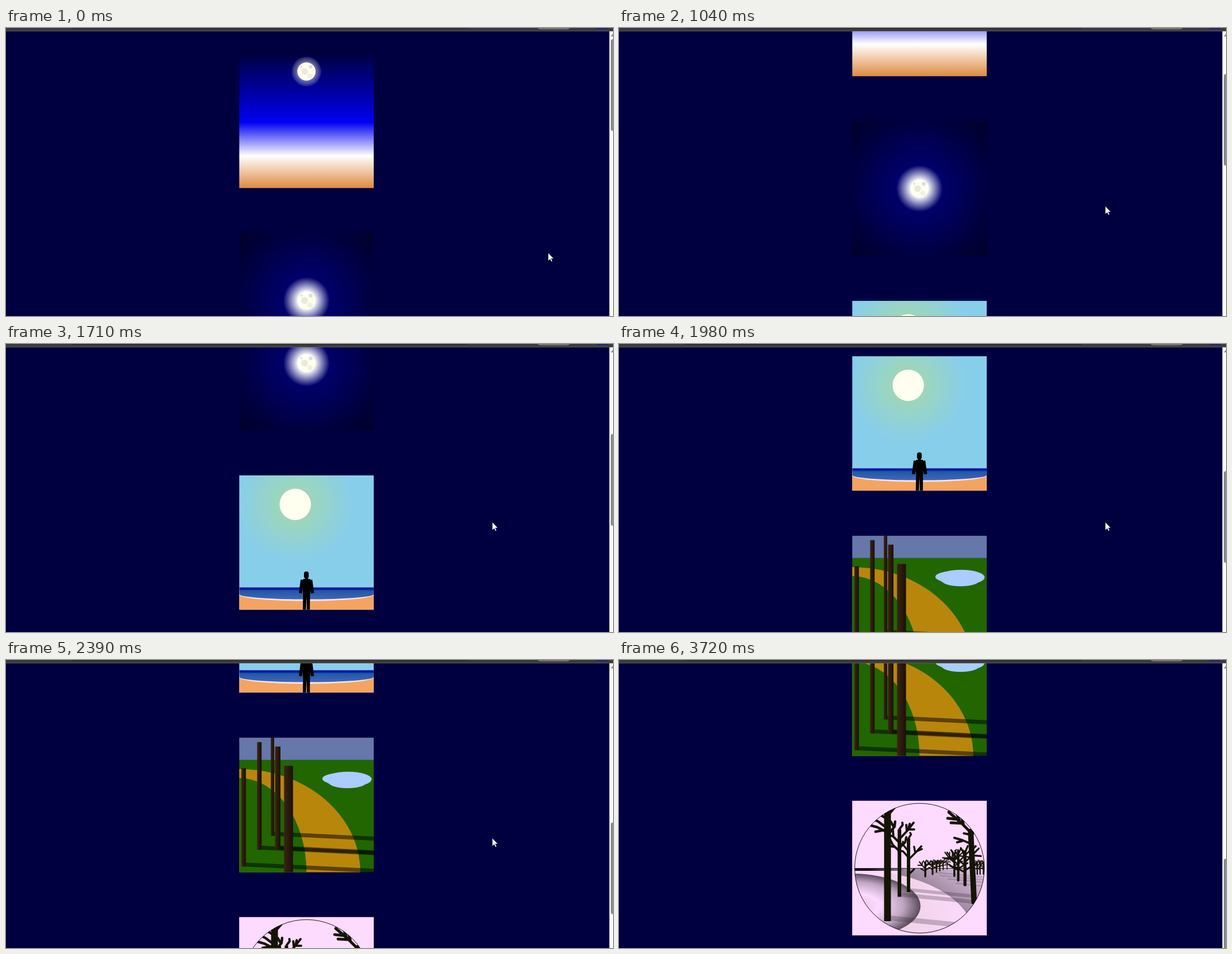
Recreate the animation shown at these times as an HTML page. Size 1086 px wide and 515 px high, loop 4650 ms.

```html
<!DOCTYPE html>
<html lang="en">
<head>
<meta charset="utf-8">
<title>Scrolling scenes</title>
<style>
  html, body { margin: 0; width: 100%; height: 100%; overflow: hidden; background: #000040; }
  svg { display: block; width: 1086px; height: 515px; }
</style>
</head>
<body>
<svg viewBox="0 0 1086 515">
  <defs>
    <linearGradient id="dusk" x2="0" y2="1">
      <stop stop-color="#000040"/><stop offset=".51" stop-color="#0000f2"/>
      <stop offset=".76" stop-color="#fff"/><stop offset="1" stop-color="#dd8a40"/>
    </linearGradient>
    <radialGradient id="night" r=".707">
      <stop stop-color="#000080"/><stop offset="1" stop-color="#000026"/>
    </radialGradient>
    <radialGradient id="halo">
      <stop offset=".38" stop-color="#fff" stop-opacity=".95"/><stop offset="1" stop-color="#fff" stop-opacity="0"/>
    </radialGradient>
    <radialGradient id="dimHalo">
      <stop offset=".5" stop-color="#fff" stop-opacity=".5"/><stop offset=".9" stop-color="#fff" stop-opacity=".12"/>
      <stop offset=".9" stop-color="#fff" stop-opacity=".03"/><stop offset="1" stop-color="#fff" stop-opacity="0"/>
    </radialGradient>
    <radialGradient id="day" gradientUnits="userSpaceOnUse" cx="125" cy="65" r="130">
      <stop offset=".25" stop-color="#9ed6b9"/><stop offset="1" stop-color="#87ceeb"/>
    </radialGradient>
    <linearGradient id="sea" gradientUnits="userSpaceOnUse" x1="0" y1="250" x2="0" y2="279">
      <stop stop-color="#0010a0"/><stop offset=".14" stop-color="#0019a4"/>
      <stop offset=".25" stop-color="#2059a3"/><stop offset="1" stop-color="#4866be"/>
    </linearGradient>
    <linearGradient id="bark">
      <stop stop-color="#3a2512"/><stop offset="1" stop-color="#1a1005"/>
    </linearGradient>
    <linearGradient id="strip">
      <stop offset=".3" stop-color="#141214"/><stop offset="1" stop-color="#8a778c"/>
    </linearGradient>
    <linearGradient id="field" x1="0" y1="1" x2=".9" y2="0">
      <stop offset=".2" stop-color="#4c404e"/><stop offset=".55" stop-color="#9a859c"/><stop offset="1" stop-color="#e3c4e5"/>
    </linearGradient>
    <linearGradient id="road">
      <stop offset=".3" stop-color="#fddaff"/><stop offset=".7" stop-color="#efd2e6"/><stop offset="1" stop-color="#fddaff"/>
    </linearGradient>
    <radialGradient id="hill">
      <stop stop-color="#e0c0e2"/><stop offset=".4" stop-color="#fddaff"/>
      <stop offset=".75" stop-color="#c0a5c2"/><stop offset="1" stop-color="#5a4d5c"/>
    </radialGradient>
    <clipPath id="square"><rect width="300" height="300"/></clipPath>
    <clipPath id="disc"><circle cx="537.7" cy="372.3" r="116"/></clipPath>
    <clipPath id="view"><rect y="6" width="1080" height="509"/></clipPath>
  </defs>
  <rect width="1086" height="515" fill="#000040"/>
  <g clip-path="url(#view)"><g id="page"></g></g>
  <rect width="1086" height="5" fill="#3b3b3b"/>
  <rect x="118" width="710" height="1" fill="#222"/>
  <rect y="5" width="1086" height="1" fill="#5a5a50"/>
  <path d="M952 0q2 1.5 6 1.5h44q4 0 6-1.5" fill="none" stroke="#c8b8a0"/>
  <rect x="1057" width="19" height="1.5" fill="#1818a0"/>
  <rect x="1079.5" y="6" width="6.5" height="509" fill="#fcfcfc"/>
  <path d="M1082 15l4-5v5z" fill="#888"/>
  <rect id="thumb" x="1082" y="20" width="10" height="164" rx="4" fill="#8a8a8a"/>
  <path id="cursor" d="M0 0V14.5L3.4 11.4L5.6 16L7.7 15L5.6 10.4H10Z" fill="#fff" stroke="#000" stroke-width=".6"/>
</svg>
<script>
const byId = id => document.getElementById(id);
const rect = (x, y, w, h, fill, more = '') =>
  `<rect x="${x}" y="${y}" width="${w}" height="${h}" fill="${fill}" ${more}/>`;
const oval = (x, y, rx, ry, fill) =>
  `<ellipse cx="${x}" cy="${y}" rx="${rx}" ry="${ry}" fill="${fill}"/>`;
const shape = (d, fill) => `<path d="${d}" fill="${fill}"/>`;
const panel = (index, content) =>
  `<g transform="translate(417.2 ${45.7 + 321 * index}) scale(.8025)"><g clip-path="url(#square)">${content}</g></g>`;

function moon(y, haloRadius, halo) {
  return oval(150, y, haloRadius, haloRadius, `url(#${halo})`) +
    oval(150, y, 20.3, 20.3, '#fffff0') +
    oval(146, y, 7.6, 7.6, '#ebe9da') + oval(159.5, y - 10.5, 4.3, 4.3, '#dedee0') +
    oval(138.5, y - 11, 2.5, 2.5, '#dedee0') + oval(158, y + 10.5, 6, 6, '#f2f0df');
}

function beach() {
  const limb = (x1, x2) =>
    `<path d="M${x1} 233L${x2} 263" stroke="#000" stroke-width="7"/>`;
  return rect(0, 0, 300, 300, 'url(#day)') + oval(125, 65, 35, 35, '#fffff0') +
    rect(0, 250, 300, 50, '#f4a460') +
    shape('M0 250H300V266A150 14.5 0 0 1 0 266Z', '#f6d9c4') +
    shape('M0 250H300V265.5A150 13.5 0 0 1 0 265.5Z', '#e8ecfa') +
    shape('M0 250H300V265A150 11.5 0 0 1 0 265Z', 'url(#sea)') +
    rect(144.5, 214.5, 10.5, 15.5, '#000', 'rx="4.5"') + rect(147, 226, 6, 8, '#000') +
    rect(142, 231, 16.5, 30, '#000', 'rx="2"') +
    limb(140.5, 136.5) + limb(159.5, 163.5) +
    shape('M142.5 258H158L157.5 300H150.8L150 268L148.8 300H141.8Z', '#000');
}

function forest() {
  // x, top, width, bottom
  const trunks = [[5, 68, 10, 287.5], [40, 10, 10, 250], [70.5, 0, 7.5, 219], [80, 20, 12, 250], [100, 63, 20, 320]];
  const shadow = ([x, , w, bottom]) =>
    shape(`M${x + w} ${bottom - 9}l300 14.5v9l-300 -14.5z`, 'rgba(0,0,0,.5)');
  return rect(0, 0, 300, 50, '#6677aa') + rect(0, 50, 300, 250, '#216600') +
    oval(0, 300, 270, 230, '#b8860b') + oval(0, 300, 150, 210, '#216600') +
    oval(242.8, 92.9, 52.4, 16.8, '#aaccff') + oval(220.5, 91.6, 35, 12, '#aaccff') +
    oval(241.5, 100.4, 41.5, 12.3, '#aaccff') +
    trunks.map(shadow).join('') +
    trunks.map(([x, y, w, bottom]) => rect(x, y, w, bottom - y, 'url(#bark)')).join('');
}

const bark = '#141405';
const strokes = (d, width) =>
  `<path d="${d}" fill="none" stroke="${bark}" stroke-width="${width}" stroke-linecap="round" stroke-linejoin="round"/>`;

function smallTree(x, base, height, width) {
  const place = `translate(${x} ${base}) scale(${height})`;
  return `<g transform="${place}">` + strokes('M0 0V-.95', width / height) +
    strokes('M0 -.65L.2 -.85L.4 -1.05M.2 -.85L.46 -.83M.2 -.85L.17 -1.08M0 -.55L-.22 -.76L-.4 -1M-.22 -.76L-.5 -.77' +
      'M-.22 -.76L-.2 -1M0 -.92L.08 -1.12M0 -.85L-.12 -1.06M0 -.42L.34 -.62M0 -.36L-.3 -.52', width * .6 / height) + '</g>';
}

function winter() {
  const shadow = (x, y, length, thick, alpha = .25) =>
    shape(`M${x} ${y}l${length} ${length * .1}v${thick}l${-length} ${-length * .1}z`, `rgba(40,30,42,${alpha})`);
  const midTrees = [[548, 387, 26, 3.5], [561, 383, 23, 3], [568, 379, 19, 2.4], [574, 377, 18, 2.2], [580, 375, 16, 1.8],
    [587, 374, 15, 1.5], [641, 383, 23, 2.4], [646, 383, 22, 2.2], [652, 383, 23, 2.2],
    [600, 386, 42, 3.6], [607, 394, 50, 4.4], [619, 402, 62, 5.5]];
  const scene =
    rect(500, 373, 160, 120, 'url(#field)') +
    oval(417, 492, 217, 117, 'url(#road)') + rect(417, 377, 60, 8, '#fddaff') +
    oval(417, 440, 122.5, 58, 'url(#hill)') +
    rect(421, 372, 88, 5, 'url(#strip)') + rect(421, 372, 234, 1, '#302a32') +
    [378, 384, 390, 398].map((y, i) => shadow(560 + 14 * i, y, 90, 2.5, .18)).join('') +
    shadow(486, 457, 130, 9) + shadow(504, 416, 126, 7) + shadow(520, 408, 110, 6) +
    midTrees.map(tree => smallTree(...tree)).join('') +
    rect(515, 319, 6, 96, bark) + rect(498.5, 303, 6.5, 120.5, bark) + rect(474.3, 260, 12.2, 207, bark) +
    strokes('M518 322V319L522.5 312L521 309M517 341L508 330L500 326M509 331L508 325M519 356L530 345L541 333M530 345L528 334' +
      'M533 342L542 338M517 352L508 342M508 342L500 341M521 381L528 374', 3.4) +
    strokes('M502 306V302L507.5 295L507 291M503 319L516 305L527 291M515 306L514 295M519 303L528 303M518 302L520 293' +
      'M500 325L491 316L490 304M491 316L484 313M500 340L490 331L484 319M492 334L485 333M503 335L512 326L514 317', 4) +
    strokes('M480 279L493 264M478 283L466 276M476 298L464 289L456 285M476 306L462 299L451 296M475 304L459 307' +
      'M484 309L493 298L494 289M492 299L486 289', 4.5) +
    shape('M624 302H634L640.5 438L630.5 436Z', bark) +
    strokes('M630 309L612 291L590 272M606 285L588 283M614 292L594 291M616 293L613 280M609 287L604 273', 5) +
    strokes('M628 328L614 322L600 318M616 323L605 326M627 312L617 310M632 312L640 303M630 340L638 333', 4);
  return rect(417.2, 251.7, 240.75, 240.75, '#fddaff') +
    `<g clip-path="url(#disc)">${scene}</g>` +
    '<circle cx="537.7" cy="372.3" r="116" fill="none" stroke="#000" stroke-width=".9"/>';
}

byId('page').innerHTML =
  panel(0, rect(0, 0, 300, 300, 'url(#dusk)') + moon(40, 36, 'dimHalo')) +
  panel(1, rect(0, 0, 300, 300, 'url(#night)') + moon(150, 52, 'halo')) +
  panel(2, beach()) + panel(3, forest()) +
  `<g transform="translate(0 1078)">${winter()}</g>`;

const duration = 4650;
// time, scroll offset
const scrollSteps = [[0, 0], [780, 22], [850, 65], [910, 110], [980, 155], [1040, 200], [1110, 262], [1180, 325], [1250, 382],
  [1310, 394], [1710, 453], [1780, 510], [1850, 563], [1910, 615], [1980, 666], [2050, 717], [2120, 764], [2190, 806],
  [2260, 840], [2320, 862], [2390, 870], [2790, 908], [2860, 957], [2930, 1005], [2990, 1044], [3050, 1068], [3120, 1078]];
// time, x, y
const cursorSteps = [[0, 970, 402], [70, 870, 318.5], [3520, 893, 350], [3590, 950, 420], [3650, 1021, 499], [3720, 1060, 560]];
const stepAt = (steps, time) => steps.findLast(step => step[0] <= time);

function draw() {
  const time = performance.now() % duration;
  const [, scroll] = stepAt(scrollSteps, time);
  const [, x, y] = stepAt(cursorSteps, time);
  byId('page').setAttribute('transform', `translate(0 ${-scroll})`);
  byId('thumb').setAttribute('y', 20 + scroll * .311);
  byId('cursor').setAttribute('transform', `translate(${x} ${y})`);
  requestAnimationFrame(draw);
}
draw();
</script>
</body>
</html>
```
